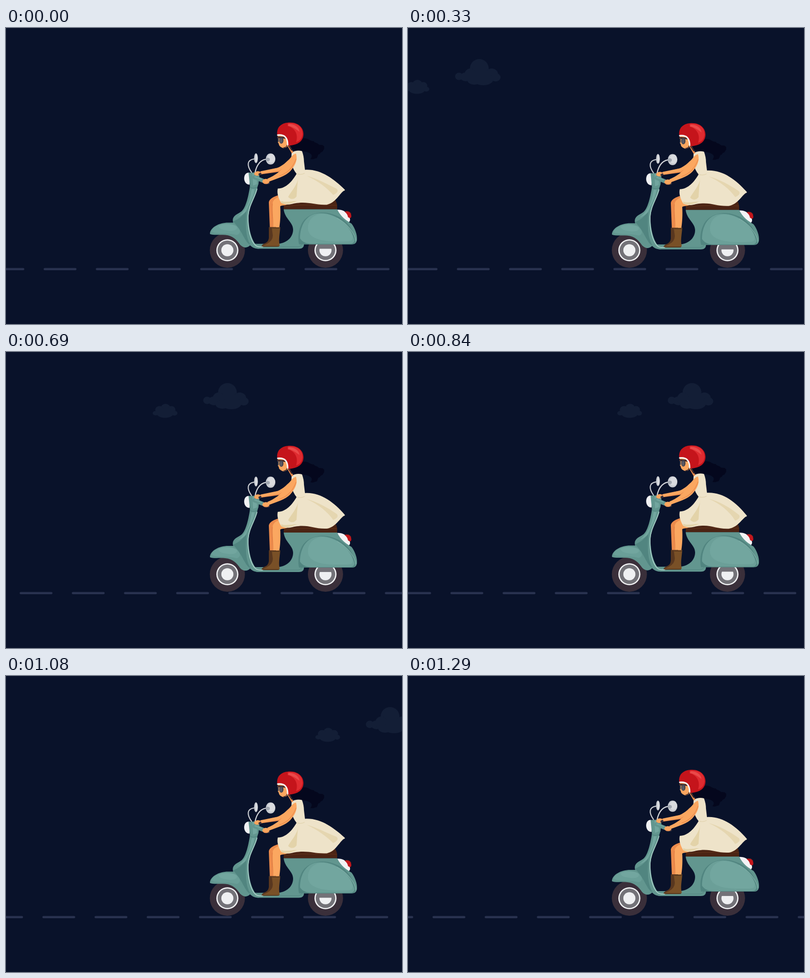
Recreate the animation shown at these times as an HTML page with a canvas. Size 800x600 px, loop 1.32 s.

```html
<!DOCTYPE html>
<html lang="en">
<head>
<meta charset="utf-8">
<title>Night ride</title>
<style>
html, body { margin: 0; width: 100%; height: 100%; overflow: hidden; background: #09122a; }
canvas { display: block; width: 800px; height: 600px; }
</style>
</head>
<body>
<canvas id="stage" width="800" height="600"></canvas>
<script>
const ctx = document.getElementById('stage').getContext('2d');
const LOOP = 1320, STEP = 30, BOUNCE = 600;

const teal = '#62968f', tealLight = '#72a69f', tealDark = '#518580', tealPale = '#a5cdc5';
const skin = '#fba760', skinDark = '#ec8b4c', cream = '#eee3c9', fold = '#e3d3a9';

function fill(path, color) {
  ctx.fillStyle = color;
  ctx.fill(new Path2D(path));
}

function line(path, color, width) {
  ctx.strokeStyle = color;
  ctx.lineWidth = width;
  ctx.lineCap = ctx.lineJoin = 'round';
  ctx.stroke(new Path2D(path));
}

function oval(x, y, rx, ry, color, angle = 0) {
  ctx.fillStyle = color;
  ctx.beginPath();
  ctx.ellipse(x, y, rx, ry, angle, 0, Math.PI * 2);
  ctx.fill();
}

// Quick drop, slower rise back.
function bounceOffset(t) {
  const frame = (t % BOUNCE) / STEP;
  const since = (frame + 7) % 20;
  const wave = since >= 14
    ? -Math.cos((since - 14) / 6 * Math.PI)
    : Math.cos(since / 14 * Math.PI);
  return 0.5 + 2.55 * wave;
}

function drawRoad(t) {
  const gap = 105.4;
  const start = (76 + 0.388 * t) % gap - gap;
  ctx.fillStyle = '#29324f';
  for (let x = start; x < 800; x += gap) {
    ctx.beginPath();
    ctx.roundRect(x, 486.4, 66.4, 4.7, [8, 8, 8, 8]);
    ctx.fill();
  }
}

function drawClouds(t) {
  const x = 0.8425 * t - 134;
  const color = '#131e36';
  ctx.save();
  ctx.translate(x, 0);
  oval(0, 82, 19, 19, color);
  oval(-41, 98, 8, 7.5, color);
  oval(-27, 99, 12, 9, color);
  oval(-18, 95, 12, 13, color);
  oval(25, 94, 13, 12, color);
  oval(33, 100, 10, 8.5, color);
  oval(-10, 106, 14, 9, color);
  oval(8, 105, 20, 11, color);
  ctx.translate(-126, 0);
  oval(1, 114, 10, 9, color);
  oval(-11, 117, 9, 7.5, color);
  oval(13, 117, 8, 7.5, color);
  oval(-19, 124, 6, 4.5, color);
  oval(19, 124, 6, 5, color);
  oval(0, 124, 17, 9.5, color);
  ctx.restore();
}

function drawWheel(x) {
  const y = 450.5;
  oval(x, y, 35.5, 35.5, '#3a2f3a');
  oval(x, y, 22.3, 22.3, '#f1f2f4');
  oval(x, y, 19.7, 19.7, '#737278');
  oval(x, y, 12.2, 12.2, '#eff0f2');
}

function drawHair() {
  fill('M574 239 C582 231 590 223 603 223 C613 224 614 229 622 229 C623 233 628 231 631 235 ' +
    'C634 238 639 234 643 240 C642 243 644 245 641 247 C640 252 635 250 634 255 ' +
    'C629 255 631 260 627 264 C624 263 623 267 615 265 C620 259 618 255 611 252 ' +
    'C600 247 590 253 578 244 Z', '#04071d');
}

function drawMirrors() {
  line('M496 292 C486 278 487 267 501 265', '#c8cbd0', 2.2);
  line('M503 293 C507 274 516 265 530 265', '#d4d6da', 2.2);
  oval(505, 263.5, 3.8, 10, '#c9ccd2');
  oval(506, 263.5, 2.2, 8.5, '#dadce0');
  oval(534.5, 265, 9.7, 11.3, '#c8cbd1');
  oval(536, 263.8, 7.5, 9, '#d9dbdf');
  oval(529, 266, 4, 3.5, '#a2a8b1');
}

function drawBody() {
  // Bracket over the rear hub
  ctx.fillStyle = '#737278';
  ctx.fillRect(632, 436, 27, 11);

  // Tail lamp
  fill('M669 368 C678 367 687 371 692 380 C696 386 696 390 693 393 C682 390 675 381 669 368 Z', '#f3f3f5');
  fill('M684 372 C690 370 695 371 697 377 C698 381 698 384 695 385 L691 383 C690 378 688 375 684 372 Z', '#c3161c');
  line('M685 371.5 Q694 370 697 376', '#7e241f', 1);

  // Seat
  fill('M561 367 L561 357 C585 349 636 353 665 348 Q670 355 669 367 Z', '#4b2414');
  line('M563 361 Q614 356 668 359', '#5e3019', 1.2);

  // Floor and rear shell
  fill('M561 367 L669 367 C676 382 688 390 698 396 C705 405 710 419 709 429 ' +
    'C708 435 705 438 699 438 L602 438 C602 444 598 447 592 447 L511 447 ' +
    'C499 447 494 442 490 434 L505 437 L551 437 C570 434 580 422 580 408 ' +
    'C580 393 563 386 561 367 Z', teal);
  line('M503 443 L590 443 Q597 442 598 437', tealDark, 1);
  fill('M592 438 C589 424 591 409 597 397 C607 377 634 368 660 377 ' +
    'C686 385 704 406 705 433 Q704 438 698 438 Z', tealDark);
  fill('M594 426 C594 399 607 376 633 375 C665 373 697 398 704 430 Q703 437 695 437 ' +
    'L618 437 Q601 437 594 426 Z', '#6b9f98');
  fill('M610 406 C610 386 624 376 640 376 C666 377 692 398 700 420 ' +
    'C702 431 696 432 686 432 C650 433 611 431 610 406 Z', tealLight);
  line('M669 385 C688 395 704 414 707 431', '#83b2aa', 1.2);

  // Front fender and leg shield
  fill('M412 417 C412 404 430 394 449 394 L459 394 C455 380 468 377 476 371 ' +
    'C485 363 490 339 493 320 L509 318 C505 338 492 356 490 378 C489 399 494 426 505 439 ' +
    'L511 447 Q502 447 493 440 C487 446 480 446 473 439 C466 429 458 420 443 419 ' +
    'C430 418 419 420 412 417 Z', teal);
  fill('M416 409 C425 396 448 393 464 400 C475 407 475 417 466 419 ' +
    'C448 414 430 418 416 413 Z', '#6a9f98');
  fill('M429 401 C439 395 458 396 466 402 C469 408 461 412 448 410 C438 409 431 407 429 401 Z', tealLight);
  fill('M459 392 C467 387 478 384 486 366 C484 396 483 421 494 439 ' +
    'C483 436 479 412 459 392 Z', tealDark);
  fill('M496 326 L502 326 C500 345 488 360 485 371 C480 378 473 380 466 384 ' +
    'C486 369 493 350 496 326 Z', tealLight);
  line('M507 326 C503 343 490 360 489 381 C488 405 494 431 504 440 Q508 444 519 443', tealPale, 1.8);

  // Steering head and lamp
  fill('M492 293 C478 290 477 317 492 317 Z', '#f0f1f3');
  fill('M490 293 L507 292 L512 299 L510 316 L507 323 Q499 327 493 322 Z', teal);
  fill('M498 294 L507 294 L507 316 L499 319 Z', tealLight);
  line('M493 322 Q500 326 507 322', tealDark, 1.2);
}

function drawLegs() {
  fill('M558 337 C544 339 531 345 531 354 L533 405 L545 405 L549 351 Z', skinDark);
  fill('M550 337 L580 350 C568 361 558 358 554 361 C555 377 554 393 552 405 L538 405 ' +
    'C540 386 536 365 539 353 Q540 347 550 342 Z', skin);
  line('M538 356 C537 373 540 390 539 403', '#db743e', 1);
  fill('M531 403 L546 403 L541 438 L531 442 L516 442 Q517 438 525 435 Q532 431 531 420 Z', '#59371f');
  fill('M537 404 L554 403 C553 418 550 430 553 440 Q552 443 547 443 L518 443 ' +
    'Q519 440 527 437 Q539 431 539 420 Z', '#795027');
  line('M538 405 L553 405 M520 442 L551 442', '#4b2d19', 1.2);
}

function drawDress(flutter) {
  const tipY = 332 + flutter, hemY = 358.5 + flutter * 0.4;
  fill('M577 252 Q587 246 598 249 Q602 260 602 270 L604 287 ' +
    `C635 285 662 305 684 ${tipY - 3} Q686 ${tipY - 1} 682 ${tipY} ` +
    `C672 ${tipY + 8} 665 ${hemY - 3} 648 ${hemY} ` +
    `C624 ${hemY + 1} 614 352 591 354 C576 355 570 361 556 354 ` +
    'C550 344 547 334 549 325 C566 325 579 309 587 295 Q580 287 576 272 Z', cream);
  fill('M591 301 C589 318 575 332 570 342 C577 349 583 346 587 341 C588 329 588 317 591 301 Z', fold);
  fill(`M607 299 C630 309 650 325 661 ${tipY + 8} C671 ${tipY + 4} 672 ${tipY - 2} 667 ${tipY - 5} ` +
    'C650 317 630 305 607 299 Z', '#e5d6b0');
  fill('M556 350 C564 354 578 350 588 350 C576 355 566 359 556 354 Z', fold);
  line('M587 295 Q596 298 603 294', '#dfcfa7', 1);
}

function drawArms() {
  fill('M577 264 C564 273 558 279 549 283 L514 291 Q506 287 501 295 ' +
    'Q502 299 508 299 L516 296 L552 291 C566 284 580 275 583 263 Z', skinDark);
  fill('M576 262 C564 273 559 279 548 283 L514 290 L516 295 L551 289 ' +
    'C564 282 577 274 581 262 Z', skin);
  oval(508, 294.5, 6, 4.3, skin);

  line('M502 302 L519 309', teal, 8);
  line('M503 301 L516 306', tealLight, 2.5);
  line('M512 296 L514 295', '#35313c', 4);
  line('M527 313 L530 313', '#39343f', 6);

  fill('M586 254 C578 255 573 266 565 276 C556 289 543 299 528 305 ' +
    'L531 311 C547 305 564 300 574 290 C583 280 588 270 587 260 Z', skin);
  line('M586 265 C580 281 569 294 553 299', skinDark, 1.3);
  oval(525, 310.5, 7, 5.2, skin);
  line('M520 313 Q525 316 530 314', skinDark, 1);
}

function drawHead() {
  line('M570 237 L578 251', skinDark, 4);
  line('M571 238 L577 247', '#332126', 2);
  fill('M549 216 L569 218 L570 236 Q568 243 560 243 Q551 240 551 234 L549 231 Z', skin);
  fill('M548 219 L566 220 L565 224 L548 223 Z', '#4f2c25');
  line('M550 222 L550 230', '#464750', 2);
  oval(556.2, 227.2, 4.4, 6.7, '#44434d');
  oval(555.5, 228, 2.4, 4.7, '#5a5b65');
  line('M568 236 Q567 242 561 242', '#3b2528', 1.4);

  fill('M548 216 C546 199 558 191 574 191 C591 191 601 202 601 214 ' +
    'C601 228 591 237 570 238 C569 225 566 217 548 216 Z', '#c5141b');
  fill('M569 193 C589 190 600 201 599 215 C598 224 593 229 586 231 ' +
    'C592 213 581 201 569 198 Z', '#df2b30');
  fill('M571 194 C584 194 592 201 593 210 C585 204 578 199 570 198 Z', '#ea494a');
  line('M549 216.5 C563 215 569 222 569 236', '#f8f5f2', 3);
}

function draw(t) {
  const flutter = 4 * Math.cos((t - 204) / BOUNCE * Math.PI * 2);
  ctx.fillStyle = '#09122a';
  ctx.fillRect(0, 0, 800, 600);
  drawClouds(t);
  drawRoad(t);
  drawWheel(447.2);
  drawWheel(645.4);
  ctx.save();
  ctx.translate(0, bounceOffset(t));
  drawHair();
  drawMirrors();
  drawBody();
  drawLegs();
  drawDress(flutter);
  drawArms();
  drawHead();
  ctx.restore();
}

const began = performance.now();
function tick() {
  const t = (performance.now() - began) % LOOP;
  draw(Math.floor(t / STEP) * STEP);
  requestAnimationFrame(tick);
}
tick();
</script>
</body>
</html>
```
